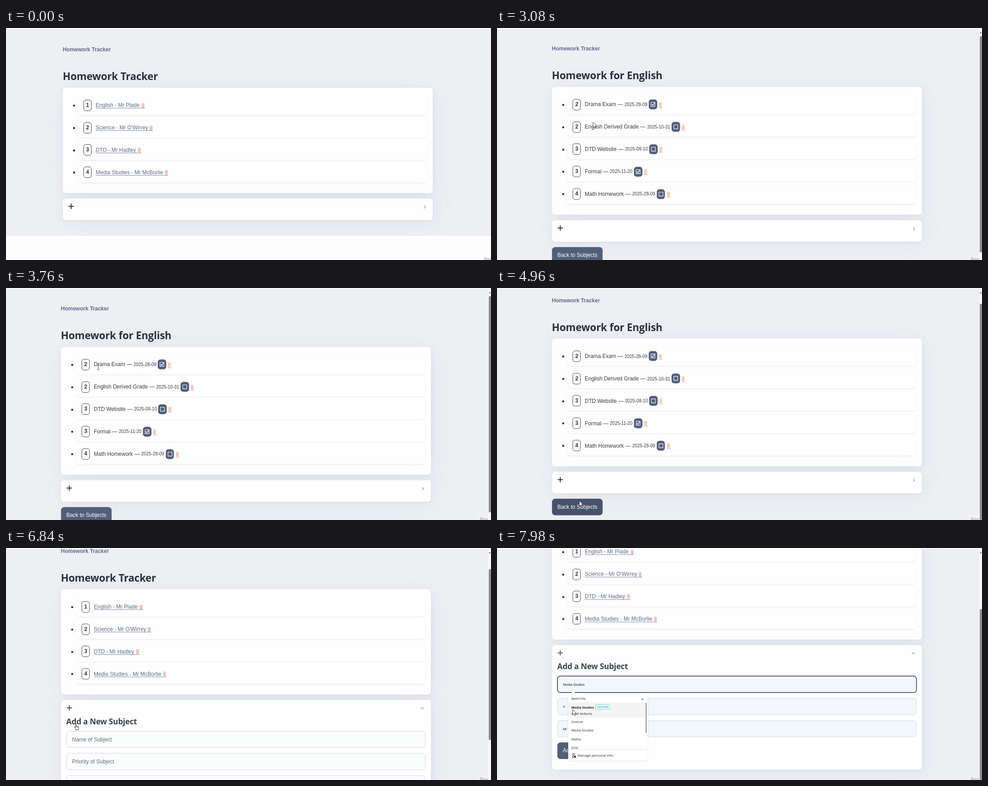
Animation, 1083 px wide and 517 px high, one loop 8000 ms. Source, as an HTML page:

```html
<!DOCTYPE html>
<html lang="en">
<head>
<meta charset="utf-8">
<title>Homework Tracker</title>
<style>
html, body { margin: 0; width: 100%; height: 100%; overflow: hidden; background: #fdfdfe; }
body { font: 12px "Liberation Sans", Arial, sans-serif; color: #373c44; }
div, svg, h1, h2 { box-sizing: border-box; margin: 0; }
#stage { position: absolute; left: 0; top: 0; width: 1083px; height: 517px; overflow: hidden; }
#back { position: absolute; left: 0; top: 0; width: 1083px; overflow: hidden; background: #eeeff3; }
.page { position: absolute; left: 0; top: 0; width: 1083px; height: 700px; }
.abs, .page > *, .form > * { position: absolute; white-space: nowrap; }
.brand { left: 126.7px; top: 41px; line-height: 14px; font-weight: bold; color: #5d6b89; }
h1, h2 { font-family: "Open Sans", "Noto Sans", sans-serif; font-weight: 700; }
h1 { left: 126.7px; top: 92.6px; font-size: 22.7px; line-height: 30px; letter-spacing: -.15px; color: #2d3138; }
h2 { left: 138.8px; top: 415px; font-size: 17.4px; line-height: 24px; letter-spacing: -.2px; color: #3d434d; }
.card {
  left: 126.5px; width: 826.5px; border-radius: 7px; background: #fefefe;
  box-shadow: .17px .35px 2px rgba(129,145,181,.017), .4px .8px 4.8px rgba(129,145,181,.024),
    .75px 1.5px 9px rgba(129,145,181,.03), 1.35px 2.7px 16px rgba(129,145,181,.036),
    2.5px 5px 30px rgba(129,145,181,.043), 6px 12px 72px rgba(129,145,181,.06),
    0 0 0 .75px rgba(129,145,181,.015);
}
.row {
  left: 161px; width: 780px; height: 43.7px; border-radius: 8px; background: #fefefe;
  box-shadow: 0 1.5px 3px rgba(40,50,70,.09); display: flex; align-items: center; line-height: 14px;
}
.row::before { content: ""; position: absolute; left: -11px; top: 20.4px; width: 4px; height: 4px; background: #2b3038; }
.badge {
  width: 18.4px; height: 25px; margin: 0 8.8px 0 12px; border: 1px solid #3a4049; border-radius: 5px;
  font-weight: bold; text-align: center; line-height: 23px; color: #2d3138;
}
.link { position: relative; display: flex; align-items: center; color: #5d6b89; }
.link::after, .bin::after { content: ""; position: absolute; left: 0; right: 0; bottom: 0; height: 1px; background: currentColor; opacity: .8; }
.link.hot { color: #414c66; }
.link svg { margin-left: 3.3px; color: #f0887a; }
.bin { position: relative; height: 15px; padding-top: 2px; margin-left: 3.2px; color: #ef9d78; }
.bin::after { background: #a58a8c; right: -1px; }
small { font-size: 10px; padding-top: 1px; }
.tick { width: 18.8px; height: 21.8px; margin-left: 3.2px; border-radius: 6px; background: #525f7a; }
.btn { height: 37px; padding: 0 12.2px; border-radius: 7px; background: #525f7a; color: #fff; line-height: 37px; }
.btn.hot { background: #48536b; }
.input {
  left: 138.7px; width: 802.6px; height: 37.4px; padding-left: 12px; border: 1px solid #cfd5e2; border-radius: 7px;
  background: #fbfcfc; color: #646b79; line-height: 36px;
}
.input.fill { background: #f2f6fd; color: #1b2130; font-size: 7.6px; line-height: 38px; }
.input.focus { border-color: #414e69; box-shadow: 0 0 0 .8px #414e69; }
#bar { left: 1076.5px; top: 0; width: 6.5px; height: 517px; background: #f8f8f9; }
#bar i { position: absolute; left: 1.7px; width: 5px; border-radius: 3px; background: #8b8b8c; }
#bar::before { content: ""; position: absolute; left: 1.4px; top: 8px; border: 2.6px solid transparent; border-top: 0; border-bottom: 4px solid #7b7b7c; }
#note { top: 507px; height: 14px; padding-left: 5px; width: 40px; background: rgba(255,255,255,.25); font: bold 10px/18px "Liberation Sans", Arial, sans-serif; color: #b3b4b8; }
#strip { left: 0; top: 0; width: 1083px; height: 2px; background: #f9fafb; }
#pop {
  left: 158.5px; top: 323px; width: 177.5px; height: 151px; border-radius: 3px; background: #fff; color: #26282c;
  box-shadow: 0 1px 3px rgba(0,0,0,.14); font: 7.5px/10px "Open Sans", "Noto Sans", sans-serif;
}
#pop::before { content: ""; position: absolute; left: 8px; top: -3px; width: 7px; height: 7px; background: #fff; transform: rotate(45deg); }
#pick { left: 0; top: 21px; width: 172px; height: 34px; }
#pick.hot { background: #f4f4f4; }
.used { left: 61.5px; top: 25px; width: 32px; height: 12px; border: 1px solid #8ad3e6; border-radius: 2px; background: #e8f8fc; color: #14849f; font-size: 5.6px; line-height: 10px; text-align: center; }
#cur { left: 0; top: 0; }
#cur svg { position: absolute; overflow: visible; }
</style>
</head>
<body>
<div id="stage">
  <div id="back"><div class="page" id="home"></div><div class="page" id="tasks"></div></div>
  <div id="note" class="abs">Reg</div>
  <div id="bar" class="abs"><i></i></div>
  <div id="pop" class="abs"></div>
  <div id="strip" class="abs"></div>
  <div id="cur" class="abs"></div>
</div>
<script>
const LOOP = 8000, ROW0 = 172.2, PITCH = 49.9, FULL = 162, SHORT = 18.7;
const OPEN_TASKS = 2620, BACK_HOME = 5300, EXPAND = 6600, FOCUS = 7480, POPUP = 7560, PREVIEW = 7800;
const $ = id => document.getElementById(id);
const at = (x, y, cls, html) => `<div class="abs ${cls}" style="left:${x}px;top:${y}px">${html}</div>`;
const svg = (w, h, body) => `<svg width="${w}" height="${h}" viewBox="0 0 ${w} ${h}" fill="none" stroke="currentColor">${body}</svg>`;

const bin = svg(8, 11, '<path d="M.8 2h6.4M2.6 1.1h2.8M1.2 2.2l.6 8.1h4.4l.6-8.1M3 3l.2 6.6M5 3l-.2 6.6M4 3v6.6" stroke-width=".7"/>');
const box = done => `<div class="tick">${svg(18.8, 21.8,
  `<g stroke="#fff" stroke-width="1.1"><path d="M5 6.5h8.8v8.8H5z"/>${done ? '<path d="M6.6 10.6l2.2 2.5 4.4-5.6" stroke-width="1.5"/>' : ''}</g>`)}</div>`;
const row = (i, n, html) =>
  `<div class="row" style="top:${ROW0 - 21.85 + i * PITCH}px"><div class="badge">${n}</div>${html}</div>`;
const card = (y, h, id = '') => `<div class="card" ${id && `id="${id}"`} style="top:${y}px;height:${h}px"></div>`;
const plus = y => `<div class="plus" style="left:139px;top:${y - 6.5}px;color:#282d36">${svg(13, 13, '<path d="M6.5.6v11.8M.6 6.5h11.8" stroke-width="1.9"/>')}</div>`;
const chevron = y => `<div class="chev" style="left:930px;top:${y - 5}px;color:#868c99;width:10px;height:10px">${svg(10, 10, '<path d="M3.4 1.8L6.8 5 3.4 8.2" stroke-width="1.1"/>')}</div>`;

const subjects = [['English - Mr Plade', 309], ["Science - Mr O'Wirrey", 328], ['DTD - Mr Hadley', 301], ['Media Studies - Mr McBorlie', 362]];
const homework = [[2, 'Drama Exam', '2025-28-09', 1], [2, 'English Derived Grade', '2025-10-31', 0],
  [3, 'DTD Website', '2025-08-10', 0], [3, 'Formal', '2025-11-20', 1], [4, 'Math Homework', '2025-28-09', 0]];
const fields = [['Name of Subject', 'Media Studies'], ['Priority of Subject', '4'], ['Teacher of Subject', 'Mr McBorlie']];

$('home').innerHTML = '<div class="brand">Homework Tracker</div><h1>Homework Tracker</h1>' + card(132.5, 235) +
  subjects.map(([s], i) => row(i, i + 1, `<div class="link">${s}${bin}</div>`)).join('') +
  card(379.6, 48, 'adder') + plus(397.4) + chevron(397.6) +
  '<div class="form"><h2>Add a New Subject</h2>' +
  fields.map((f, i) => `<div class="input" style="top:${448.8 + i * 49.5}px"></div>`).join('') +
  at(138.7, 597.2, 'btn', 'Add Subject') + '</div>';

$('tasks').innerHTML = '<div class="brand">Homework Tracker</div><h1>Homework for English</h1>' + card(132.5, 285) +
  homework.map(([n, name, due, done], i) =>
    row(i, n, `<span>${name} —&nbsp;</span><small>${due}</small>${box(done)}<div class="bin">${bin}</div>`)).join('') +
  card(429.7, 48) + plus(447.4) + chevron(447.6) + at(126.7, 489.8, 'btn', 'Back to Subjects');

$('pop').innerHTML = '<div id="pick" class="abs"></div>' + at(7, 7, '', '<span style="font-size:6.6px">Saved info</span>') +
  at(163.5, 9, '', svg(6, 6, '<path d="M.7.7l4.6 4.6M5.3.7L.7 5.3" stroke-width=".8"/>')) +
  at(7.5, 27, '', '<b style="font-size:7.2px">Media Studies</b>') + at(61.5, 25, 'used', 'Last used') +
  at(7.5, 40.5, '', '<span style="font-size:6.6px">4 · Mr McBorlie</span>') +
  ['Science', 'Media Studies', 'Maths'].map((s, i) => at(7.5, 59 + i * 19.4, '', s)).join('') +
  '<div class="abs" style="left:7.5px;top:117px;height:7.5px;overflow:hidden">DTD</div>' +
  '<div class="abs" style="left:0;top:125px;width:177px;height:1px;background:#e3e3e4"></div>' +
  '<div class="abs" style="left:173px;top:22px;width:2.4px;height:67px;border-radius:2px;background:#868686"></div>' +
  at(8, 133.5, '', svg(10, 11, '<circle cx="4" cy="2.8" r="2"/><path d="M4.5 9.5H1V8q0-1.7 2-1.7h2"/><path d="M5.2 6.8h3.6v3H5.2z" fill="currentColor"/>')) +
  at(21.5, 134, '', '<span style="font-size:7.8px">Manage personal info</span>');

const shapes = {
  arrow: '<path d="M0 0v12l2.7-2.5 1.8 4 1.7-.8-1.8-3.8h3.6z" fill="#fff" stroke="#222" stroke-width=".8"/>',
  hand: '<path d="M-1 1q1-1.6 2 0v4.4l4.2 1q1 .4.8 1.8l-.8 3.1v1.7H-.8v-1.4l-3-3.8q-.2-1.6 1.2-1.1L-1 8.1z" fill="#fff" stroke="#222" stroke-width=".9"/><path d="M1 5.5v2M2.7 6v1.8M4.3 6.4v1.7" stroke="#222" stroke-width=".7"/>',
  beam: '<path d="M-2-5.5h1.5l.5.5.5-.5H2M0-5V5M-2 5.5h1.5L0 5l.5.5H2" stroke="#333" stroke-width=".9"/>'
};
$('cur').innerHTML = Object.values(shapes).map(s => svg(1, 1, s)).join('');

// time, x, y, pointer shape from there on
const path = [
  [460, 560, 520, 'arrow'], [1240, 318, 262, 'arrow'], [1610, 318, 262, 'arrow'], [2410, 231.5, 174, 'hand'],
  [2680, 231.5, 174, 'arrow'], [3080, 214.5, 210, 'arrow'], [3350, 214.5, 210, 'arrow'], [3600, 208, 184, 'beam'],
  [3760, 206, 176.5, 'beam'], [3810, 206, 177, 'arrow'], [4090, 148, 420, 'hand'], [4160, 148, 420, 'hand'],
  [4450, 158, 444, 'arrow'], [4960, 184, 474, 'arrow'], [5500, 184, 474, 'arrow'], [6240, 446, 118, 'arrow'],
  [6310, 446, 118, 'arrow'], [6560, 156.5, 392, 'hand'], [7180, 156.5, 392, 'beam'], [7420, 170, 306, 'beam'],
  [7600, 170, 306, 'arrow'], [7900, 169, 360, 'arrow'], [8000, 169, 360, 'arrow']
];
const clamp = v => Math.max(0, Math.min(1, v));
const smooth = p => p * p * (3 - 2 * p);
const inOut = p => p < .5 ? 4 * p ** 3 : 1 - 4 * (1 - p) ** 3;
const ramp = (t, a, b) => inOut(clamp((t - a) / (b - a)));

function pointer(t) {
  let i = 0;
  while (i < path.length - 2 && t >= path[i + 1][0]) i++;
  const [t0, x0, y0, shape] = path[i], [t1, x1, y1] = path[i + 1];
  const p = smooth(clamp((t - t0) / (t1 - t0)));
  return { x: x0 + (x1 - x0) * p, y: y0 + (y1 - y0) * p, shape };
}

const home = $('home'), tasks = $('tasks'), bar = $('bar'), thumb = bar.firstChild;
const links = [...home.querySelectorAll('.link')], inputs = [...home.querySelectorAll('.input')];
const form = home.querySelector('.form'), homePlus = home.querySelector('.plus'), homeChev = home.querySelector('.chev');
const backBtn = tasks.querySelector('.btn');
const show = (el, on) => { el.style.display = on ? 'block' : 'none'; };

function draw(t) {
  const onTasks = t >= OPEN_TASKS && t < BACK_HOME, open = t >= EXPAND, tall = onTasks || open;
  const scroll = onTasks ? SHORT * ramp(t, 3850, 4070) : open ? FULL * ramp(t, 6680, 7089) : 0;
  const cur = pointer(t);

  show(home, !onTasks);
  show(tasks, onTasks);
  show(form, open);
  show(bar, tall);
  $('back').style.height = (tall ? 517 : 463) + 'px';
  (onTasks ? tasks : home).style.transform = tall ? `translate(-4.2px,${-1.7 - scroll}px)` : 'none';
  thumb.style.top = 18 + scroll * (onTasks ? .91 : .728) + 'px';
  thumb.style.height = (onTasks ? 481.5 : 381.5) + 'px';
  $('note').style.left = (tall ? 1053 : 1062) + 'px';

  $('adder').style.height = (open ? 278 : 48) + 'px';
  homeChev.style.transform = open ? 'rotate(90deg)' : 'none';
  homePlus.style.color = t >= FOCUS ? '#596173' : open ? '#414753' : '#282d36';

  let shape = cur.shape;
  links.forEach((el, i) => {
    const hot = !tall && t > 460 && Math.abs(cur.y - ROW0 - i * PITCH) < 8 && cur.x > 200 && cur.x < subjects[i][1];
    el.classList.toggle('hot', hot);
    if (hot) shape = 'hand';
  });
  backBtn.classList.toggle('hot', onTasks && t > 4160 && cur.y > 469);

  const filled = t >= PREVIEW;
  inputs.forEach((el, i) => {
    el.textContent = fields[i][filled ? 1 : 0];
    el.classList.toggle('fill', filled);
    el.classList.toggle('focus', i === 0 && t >= FOCUS);
  });
  show($('pop'), t >= POPUP);
  $('pick').classList.toggle('hot', filled);

  show($('cur'), t >= 460);
  $('cur').style.transform = `translate(${cur.x}px,${cur.y}px)`;
  Object.keys(shapes).forEach((k, i) => show($('cur').children[i], k === shape));
}

const start = performance.now();
function tick() {
  draw((performance.now() - start) % LOOP);
  requestAnimationFrame(tick);
}
tick();
</script>
</body>
</html>
```
